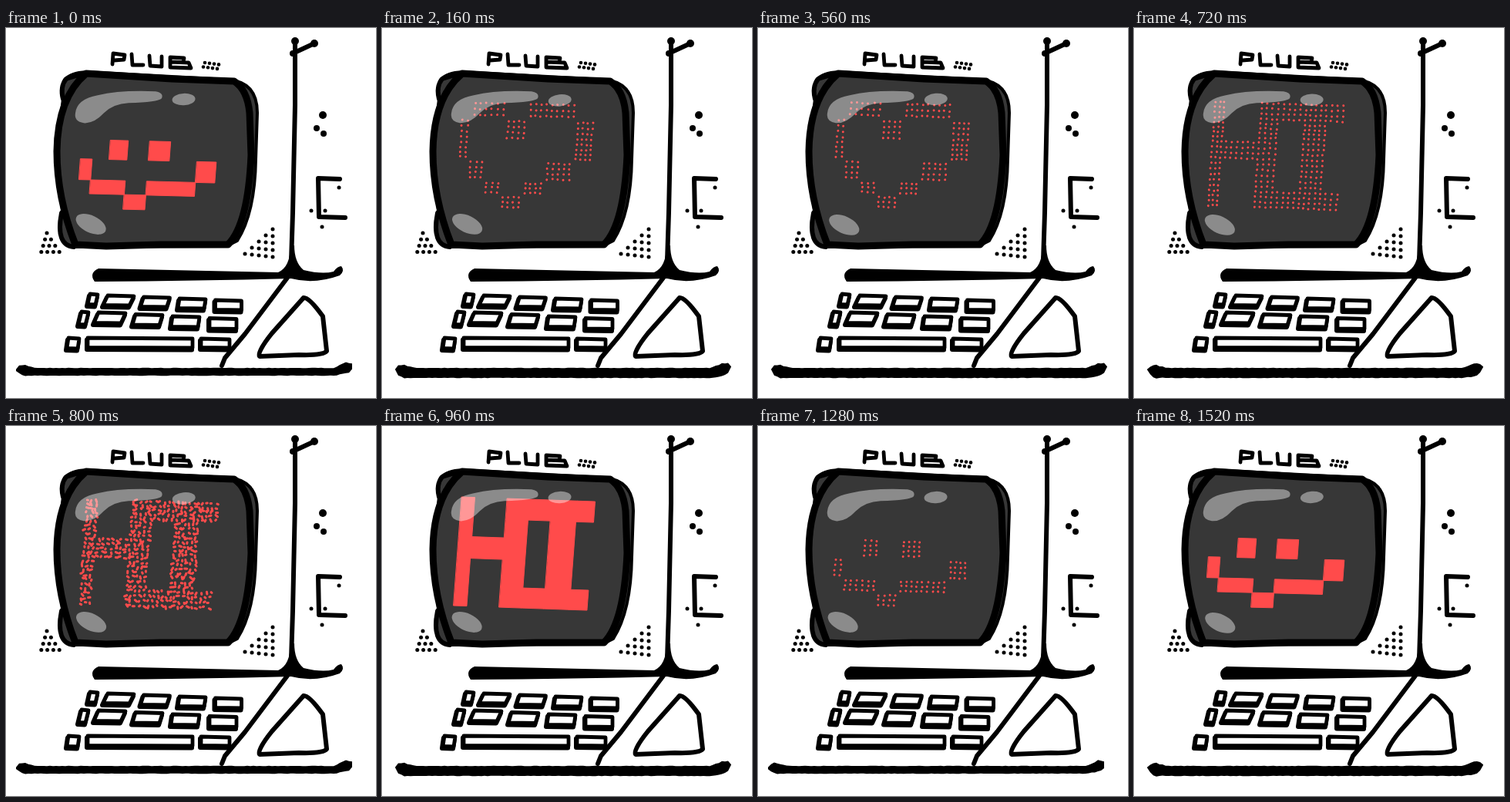
Recreate the animation shown at these times as an HTML page. Size 480 px wide and 480 px high, loop 1600 ms.

```html
<!DOCTYPE html>
<html lang="en">
<head>
<meta charset="utf-8">
<title>Friendly computer</title>
<style>
html, body { margin: 0; width: 100%; height: 100%; overflow: hidden; background: #fff; }
svg { display: block; width: 100vw; height: 100vh; }
.ink { fill: none; stroke: #000; stroke-width: 6; stroke-linecap: round; stroke-linejoin: round; }
.thin { stroke-width: 4.8; }
.thick { stroke-width: 9; }
.body { fill: #373737; stroke-width: 4; }
.red { fill: #ff4b4b; stroke: #ff4b4b; stroke-linecap: round; }
.shine { fill: #fff; fill-opacity: .42; }
.cel { visibility: hidden; animation: show 1.6s step-end infinite; }
@keyframes show {
  0% { visibility: visible; }
  5%, 100% { visibility: hidden; }
}
</style>
</head>
<body>
<svg viewBox="0 0 480 480">
  <!-- monitor -->
  <path class="ink body" d="M76 67Q84 58 104 57L215 63L288 67Q326 70 326 110L324 170Q323 240 300 276L286 283L90 284Q66 282 70 249L73 236L66 160L74 92Q71 76 76 67Z"/>
  <path class="ink thick" d="M104 59L215 66L296 69Q313 80 316 110L318 165Q314 255 288 281L200 281L130 283L90 281Q66 220 66 160Q67 90 104 59Z"/>
  <path class="ink" d="M104 58L78 66Q70 76 74 92M72 240Q64 282 88 284"/>

  <!-- name plate -->
  <path class="ink thin" d="M138 47L139 33L154 35L153 41L140 42M163 34L164 48L178 48M186 36L187 49L202 50L202 37M213 38L213 51L240 52L237 45L214 44M213 38L231 39L230 44"/>

  <!-- case -->
  <g class="ink">
    <path d="M375 17L375 100L372 240L370 302M372 33L400 20"/>
    <path d="M365 324L310 397L284 428L280 438"/>
    <path d="M433 196L405 195L406 245L440 246"/>
    <path d="M386 350Q393 349 411 374L416 419Q412 425 380 424L329 426Q325 421 345 396Z"/>
  </g>
  <path d="M369 282L374 282Q374 304 386 314Q410 320 425 316Q430 309 435 309Q440 315 433 321Q400 333 370 325Q250 328 115 329Q107 318 120 312L353 317Q369 310 369 282Z"/>

  <g id="dots"></g>
  <g id="keys"></g>
  <g id="cels"></g>
</svg>
<script>
const $ = id => document.getElementById(id);
const fill = (id, parts) => { $(id).innerHTML = parts.join(''); };
const range = n => [...Array(n).keys()];

function random(seed) {
  return () => {
    seed = (seed * 16807) % 2147483647;
    return seed / 2147483647;
  };
}

// speaker holes, vents and screws
const dot = (x, y, r = 2.5) => `<circle cx="${x}" cy="${y}" r="${r}"/>`;
const holes = (rows, cols, at) =>
  range(rows).flatMap(r => range(cols(r)).map(i => dot(...at(r, i))));
fill('dots', [
  ...holes(4, r => r + 1, (r, i) => [53 - 2.4 * r + 7.8 * i, 266 + 8.2 * r]),
  ...holes(5, r => r + 1, (r, i) => [346 - 9 * i, 261 + 9 * r - i]),
  ...holes(2, () => 4, (r, i) => [258 - 2 * r + 6 * i, 45 + 5.5 * r + i * .8, 2.3]),
  dot(432, 207), dot(396, 237), dot(414, 237), dot(410, 258),
  dot(403, 130, 4), dot(412, 137, 4), dot(411, 113, 5),
  dot(372, 33, 4), dot(375, 17, 5), dot(400, 20, 5)
]);

// a key: dark slab with a lighter cap, leaning left by s
function key(x, y, w, h = 13, s = -2) {
  const cap = `M${x} ${y}l${w} 1l${s} ${h}l${-w} ${-.5}Z`;
  return `<path class="ink" style="fill:#000" d="${cap}" transform="translate(-1 2.5)"/>` +
    `<path class="ink thin" style="fill:#fff" d="${cap}"/>`;
}
fill('keys', [
  key(109, 345, 10, 13, -3), key(98, 368, 9, 16, -4), key(81, 402, 14),
  ...range(4).map(i => key(132 + 46.5 * i, 347 + 2 * i, 34, 12, 2 * i - 6)),
  ...range(4).map(i => key(120 + 48 * i, 369 + 2.5 * i, 35, 13, 2 * i - 6)),
  key(106, 402, 136, 12, 0), key(253, 403, 37, 11, 0)
]);

// faces are drawn as slightly skewed grids of uneven cells
const cols = [95, 110, 132, 155, 183, 210, 246, 271];
const rows = [94, 117, 146, 171, 198, 216, 235];
const faces = {
  S: { cols, rows, foot: 195, tilt: .025,
       map: ['', '', '  # #', '#     #', ' ## ##', '   #'] },
  H: { cols, rows, foot: 195, tilt: .025,
       map: [' ## ##', '#  #  #', '#     #', ' #   #', '  # #', '   #'] },
  I: { cols: [93, 110, 152, 181, 210, 243, 266], rows: [94, 121, 145, 173, 209, 235],
       foot: 234, tilt: .035,
       map: ['# ####', '# # #', '### #', '# # #', '# ####'] }
};
const order = 'SSHHHHHHIIIIIIISSSSS';
const levels = '21012210001221000122'; // 0 dots, 1 dashes, 2 solid

function skew({ foot, tilt }, x, y) {
  return [x + (foot - y) * .075, y + (x - 150) * tilt];
}

function solid(face, x, y, w, h) {
  const corners = [[x, y], [x + w, y], [x + w, y + h], [x, y + h]];
  return 'M' + corners.map(([a, b]) => skew(face, a, b).join(' ')).join('L') + 'Z';
}

function specks(face, x, y, w, h, dashed, rnd) {
  const pitch = dashed ? 6 : 6.6;
  const nx = Math.round(w / pitch), ny = Math.round(h / pitch);
  const jitter = () => (rnd() - .5) * (dashed ? 3 : 1.4);
  let d = '';
  for (let j = 0; j < ny; j++) for (let i = 0; i < nx; i++) {
    const [px, py] = skew(face, x + (i + .5) / nx * w, y + (j + .5) / ny * h);
    const turn = rnd() * Math.PI, len = dashed ? 1 + rnd() * 2.5 : .1;
    d += `M${px + jitter()} ${py + jitter()}l${Math.cos(turn) * len} ${Math.sin(turn) * len}`;
  }
  return d;
}

function drawFace(n) {
  const face = faces[order[n]], level = +levels[n], rnd = random(n * 97 + 11);
  let d = '';
  face.map.forEach((line, r) => [...line].forEach((c, i) => {
    if (c !== '#') return;
    const x = face.cols[i], y = face.rows[r];
    const w = face.cols[i + 1] - x, h = face.rows[r + 1] - y;
    d += level === 2 ? solid(face, x, y, w, h) : specks(face, x, y, w, h, level === 1, rnd);
  }));
  return `<path class="red" stroke-width="${[2.9, 3, 1][level]}" d="${d}"/>`;
}

// reflections boil through four drawings
function drawShine(n) {
  const rnd = random(n % 4 * 53 + 5), k = () => (rnd() - .5) * 2;
  const spot = (x, y, rx, ry, turn) =>
    `<ellipse rx="${rx}" ry="${ry}" transform="translate(${x + k()} ${y + k()}) rotate(${turn + k() * 3})"/>`;
  return `<g class="shine"><path transform="translate(${k()} ${k()})" d="M91 110Q93 92 120 87Q150 80 195 82Q206 84 203 91Q198 96 160 97Q140 98 128 110Q115 124 102 123Q89 121 91 110Z"/>` +
    spot(230, 93, 15, 7.7, -4) + spot(111, 255, 21, 11, 26) + '</g>';
}

// table edge: swollen rough ends, heavier in some of its five drawings
function drawTable(n) {
  const heavy = n % 5 > 1, rnd = random(n % 5 * 31 + 7);
  const left = heavy ? 17 : 13, right = heavy ? 453 : 451, step = 4;
  const top = [], bottom = [];
  for (let x = left; x <= right; x += step) {
    const d = Math.min(x - left, right - x);
    const cap = Math.sqrt(Math.min(1, d / 10)), end = Math.max(0, 1 - d / 26);
    const mid = 444 - (x > 400 ? end * 4 : 0), rough = .6 + end * 2;
    top.push(`${x} ${mid - cap * (3 + 7 * end) + (rnd() - .5) * rough}`);
    bottom.unshift(`${x} ${mid + cap * (heavy ? 10 : 7) + (rnd() - .5) * rough}`);
  }
  return `<path d="M${top.concat(bottom).join('L')}Z"/>`;
}

fill('cels', range(order.length).map(n =>
  `<g class="cel" style="animation-delay:${n * 80 - 1600}ms">${drawFace(n)}${drawShine(n)}${drawTable(n)}</g>`
));
</script>
</body>
</html>
```
